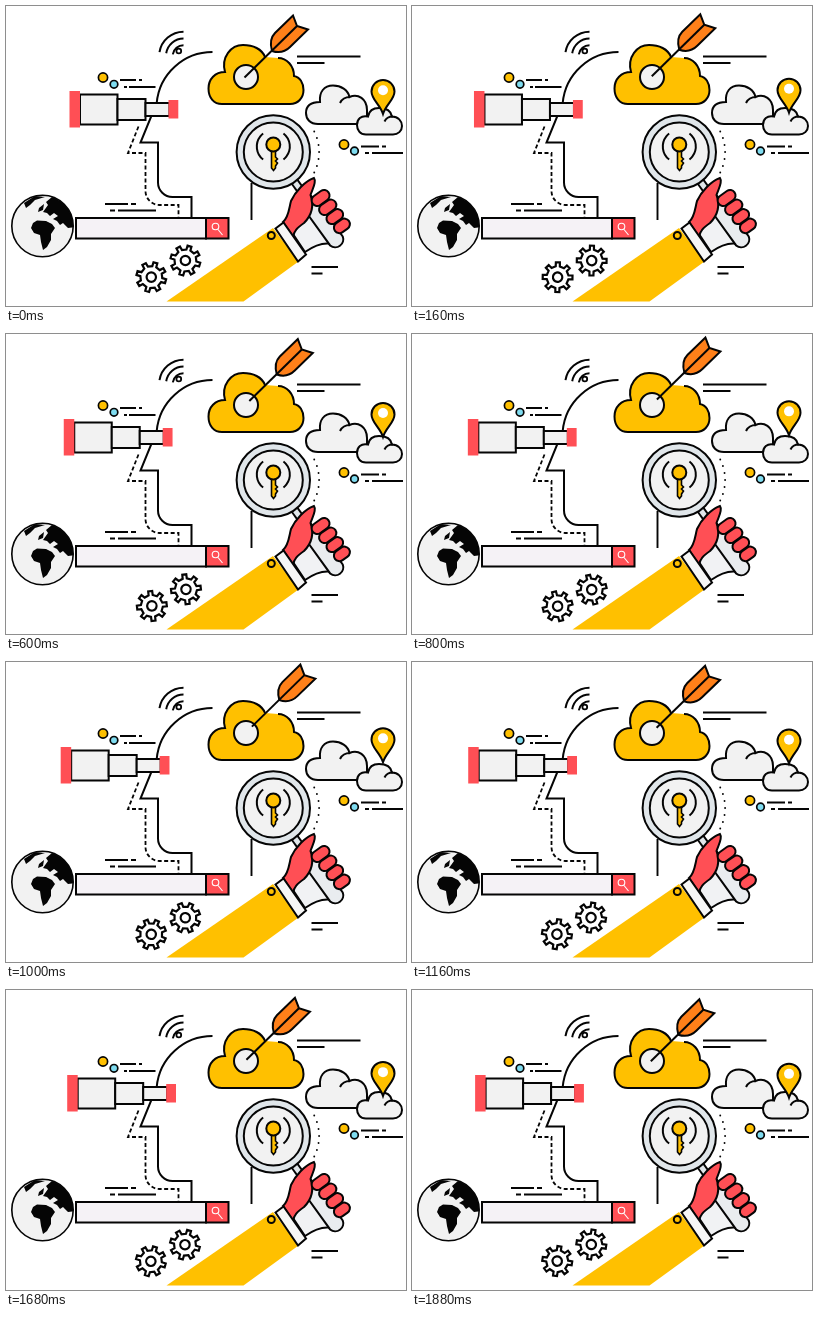
Write an HTML page with a canvas that moves like this. It is 400 px wide and 300 px high and loops after 1920 ms.

```html
<!DOCTYPE html>
<html>
<head>
<meta charset="utf-8">
<style>
html, body { margin: 0; width: 100%; height: 100%; overflow: hidden; background: #fff; }
canvas { display: block; width: 400px; height: 300px; }
</style>
</head>
<body>
<canvas id="stage" width="400" height="300"></canvas>
<script>
const ctx = document.getElementById('stage').getContext('2d');
const LOOP = 1920, STEP = 40, TAU = Math.PI * 2;
const INK = '#050505', RED = '#ff4f55', GOLD = '#ffc000', PALE = '#f2f2f2';
const ORANGE = '#ff8019', STEEL = '#e0e6ea', BLUE = '#7fdcf0';

function paint(path, fill, line = 2, ink = INK) {
  if (fill) { ctx.fillStyle = fill; ctx.fill(path); }
  if (line) { ctx.strokeStyle = ink; ctx.lineWidth = line; ctx.stroke(path); }
}
const shape = (d, fill, line, ink) => paint(new Path2D(d), fill, line, ink);

function disc(x, y, r, fill, line, ink) {
  const p = new Path2D();
  p.arc(x, y, r, 0, TAU);
  paint(p, fill, line, ink);
}

function box(x, y, w, h, fill, line) {
  const p = new Path2D();
  p.rect(x, y, w, h);
  paint(p, fill, line);
}

function arc(x, y, r, from, to, line = 2) {
  const p = new Path2D();
  p.arc(x, y, r, from * Math.PI / 180, to * Math.PI / 180);
  paint(p, null, line);
}

function at(x, y, angle, draw) {
  ctx.save();
  ctx.translate(x, y);
  ctx.rotate(angle);
  draw();
  ctx.restore();
}

function head() {
  shape('M206.500 46A56 56 0 0 0 150.700 97L134.500 136.500H152V176.500A14.500 14.500 0 0 0 166.500 191H185.500V212');
  ctx.setLineDash([4, 2.5]);
  shape('M132.500 120.500L122 147H139.500V185A14 14 0 0 0 153.500 199H172.500V212', null, 1.8);
  ctx.setLineDash([]);
}

function wifi() {
  for (const r of [10.8, 17.5, 24.3]) arc(177.5, 50, r, 189, 270);
  disc(172.8, 45, 2.4, '#fff', 1.8);
}

function notes() {
  shape('M114 74H130M133 74H136M118 81H121M123 81H149.500' +
    'M99 198H122M125 198H130M104 204.500H109M112 204.500H150' +
    'M355 140.500H373M376 140.500H380M359 147H363M366 147H397' +
    'M291 50.500H354.500M291 57H318.500M305.500 261H332M305.500 267.500H316.500M245.500 177V214', null, 1.9);
  disc(97, 71.5, 4.6, GOLD, 1.7);
  disc(108, 78.3, 3.8, BLUE, 1.7);
  disc(338, 138.5, 4.6, GOLD, 1.7);
  disc(348.5, 145, 3.8, BLUE, 1.7);
}

function globe() {
  ctx.save();
  const ball = new Path2D();
  ball.arc(36.5, 220, 30.7, 0, TAU);
  paint(ball, PALE, 0);
  ctx.clip(ball);
  shape('M27 217L31 214.500L40 215L46 218L49 222L45 228L45 234L41 241L37 244L35 236L34 229L28 227L25 222Z', INK, 0);
  shape('M37 206L42 199L40 196L46 191L52 191L70 200V221L62 222L57 217L54 219L51 215L47 213L52 210L48 207L44 210L41 207Z', INK, 0);
  shape('M18 197L29 190L39 191L29 194L24 199L20 202ZM33 202L38 198L37 204L32 206Z', INK, 0);
  ctx.restore();
  paint(ball, null, 1.6);
}

function search() {
  box(70, 212, 130, 20.5, '#f5f2f6');
  box(200, 212, 22.5, 20.5, RED);
  disc(209.5, 220.5, 3.3, null, 1.1, '#fff');
  shape('M212 223.500L216.500 229', null, 1.1, '#fff');
}

function telescope(dx) {
  at(dx, 0, 0, () => {
    box(74, 88.5, 37.5, 30, PALE);
    box(111.5, 93, 28, 21, PALE);
    box(139.5, 97, 24, 13, PALE);
    box(63.5, 85, 10.5, 36.5, RED, 0);
    box(162.5, 94, 9.8, 18.5, RED, 0);
  });
}

function target() {
  const left = 'C247 39 256 43 259 51', right = 'C281 52 288 60 288 70';
  const lobe = 'C294 71 297.500 77 297.500 84C297.500 92 292 98 284 98H216C208 98 202.500 92 202.500 82.500C202.500 73 209 66 219 66C215 51 225 39 237 39';
  shape('M272 52' + right + lobe + left + 'Z', GOLD, 0);
  shape('M272 52' + right + lobe + left);
  disc(240, 71, 12, PALE);
}

function arrow(d) {
  at(d, -d * 0.93, 0, () => {
    shape('M266 45C264 38 265 31 269 27L287 9.500L291 20L302 23.500L284 41C279 46 272 47 266 45Z', ORANGE);
    shape('M238.500 71.500L291 20');
  });
}

function greyClouds() {
  shape('M312 118C304 118 300 113 300 107C300 100 305 96 314 96C313 86 318 79.500 327 79.500C335 79.500 342 84 343.500 91C352 87 361 93 361 104V118Z', PALE);
  shape('M334 97C336 93 340 91 344 91', null);
  shape('M360 128.500C354 128.500 351 124 351 119C351 113 355 109 362 110.500C363 105 367 102 373 102C380 102 385 105 386 110.500C392 110.500 396 115 396 120C396 125 392 128.500 387 128.500Z', PALE);
  shape('M378.500 115.500C380 112 383 110.500 387 110.500', null);
}

function pin(dy) {
  at(377, 85.5 + dy, 0, () => {
    shape('M0 22.500C-3 13 -11.500 8 -11.500 0A11.500 11.500 0 0 1 11.500 0C11.500 8 3 13 0 22.500Z', GOLD);
    disc(0, -1.3, 5, '#fff', 0);
  });
}

function lens() {
  const x = 267.3, y = 146;
  shape('M286 172L298 189', null, 9);
  shape('M285 171L299 190', null, 5, STEEL);
  disc(x, y, 36.7, STEEL);
  disc(x, y, 29.5, PALE);
  arc(x, 140.5, 16.5, 128, 232);
  arc(x, 140.5, 16.5, -52, 52);
  shape('M265.500 145H269.500V151L271.500 153L269.500 155L271.500 157L269.500 160V162L267.500 164.500L265.500 162Z', GOLD, 1.6);
  disc(x, 138.5, 7, GOLD);
  for (let i = 0; i < 7; i++) {
    const a = (i - 3) * 0.155;
    disc(x + 45.8 * Math.cos(a), y + 45.8 * Math.sin(a), 0.95, INK, 0);
  }
}

function hand() {
  shape('M267 222L160.500 295.500H237.500L292.500 255.500Z', GOLD, 0);
  shape('M279 216L304 198L326 238C317 236 309 239 299 246Z', '#f1f2f4');
  at(299, 191, 0.945, () => {
    shape('M0 -5L15 -7.500H54A8 8 0 0 1 54 8H15L0 5Z', '#e9ecef');
  });
  shape('M308 172C311 176 306 184 304.500 189C309 202 304 211 298 217C291 222 288 225 287 231L277 216C283 211 283 202 285 195C289 186 299 175 308 172Z', RED);
  for (let i = 0; i < 4; i++) {
    at(314.6 + i * 7.1, 192 + i * 9.3, -0.62, () => {
      const p = new Path2D(), w = 19.5 - i * 0.8;
      p.roundRect(-w / 2, -5.5, w, 11, 5.5);
      paint(p, RED);
    });
  }
  shape('M269.500 222.500L277.500 216.500L300 248.500L292 255.500Z', '#f6f6f6');
  disc(265.3, 229.5, 3.5, GOLD);
}

function gear(x, y, turn) {
  at(x, y, turn, () => {
    const p = new Path2D();
    const slot = TAU / 8, phase = 0.28;
    for (let i = 0; i < 8; i++) {
      for (const [r, a] of [[11, -0.24], [15, -0.17], [15, 0.17], [11, 0.24]]) {
        const t = (i + a) * slot + phase;
        p.lineTo(r * Math.cos(t), r * Math.sin(t) - 0.6);
      }
    }
    p.closePath();
    paint(p, '#fff', 2.2);
    disc(0, -0.6, 4.7, '#fff', 2.2);
  });
}

function draw(time) {
  const t = Math.floor(time % LOOP / STEP) * STEP / LOOP;
  const swing = 1 - Math.abs(1 - 2 * t);
  ctx.fillStyle = '#fff';
  ctx.fillRect(0, 0, 400, 300);
  head();
  wifi();
  notes();
  globe();
  search();
  telescope(-9.2 * swing);
  target();
  arrow(7.7 * swing);
  greyClouds();
  pin(-8.2 * swing);
  lens();
  hand();
  gear(145.3, 271.7, t * TAU);
  gear(179.4, 255.1, t * TAU);
}

const start = performance.now();
function tick() {
  draw(performance.now() - start);
  requestAnimationFrame(tick);
}
draw(0);
requestAnimationFrame(tick);
</script>
</body>
</html>
```
